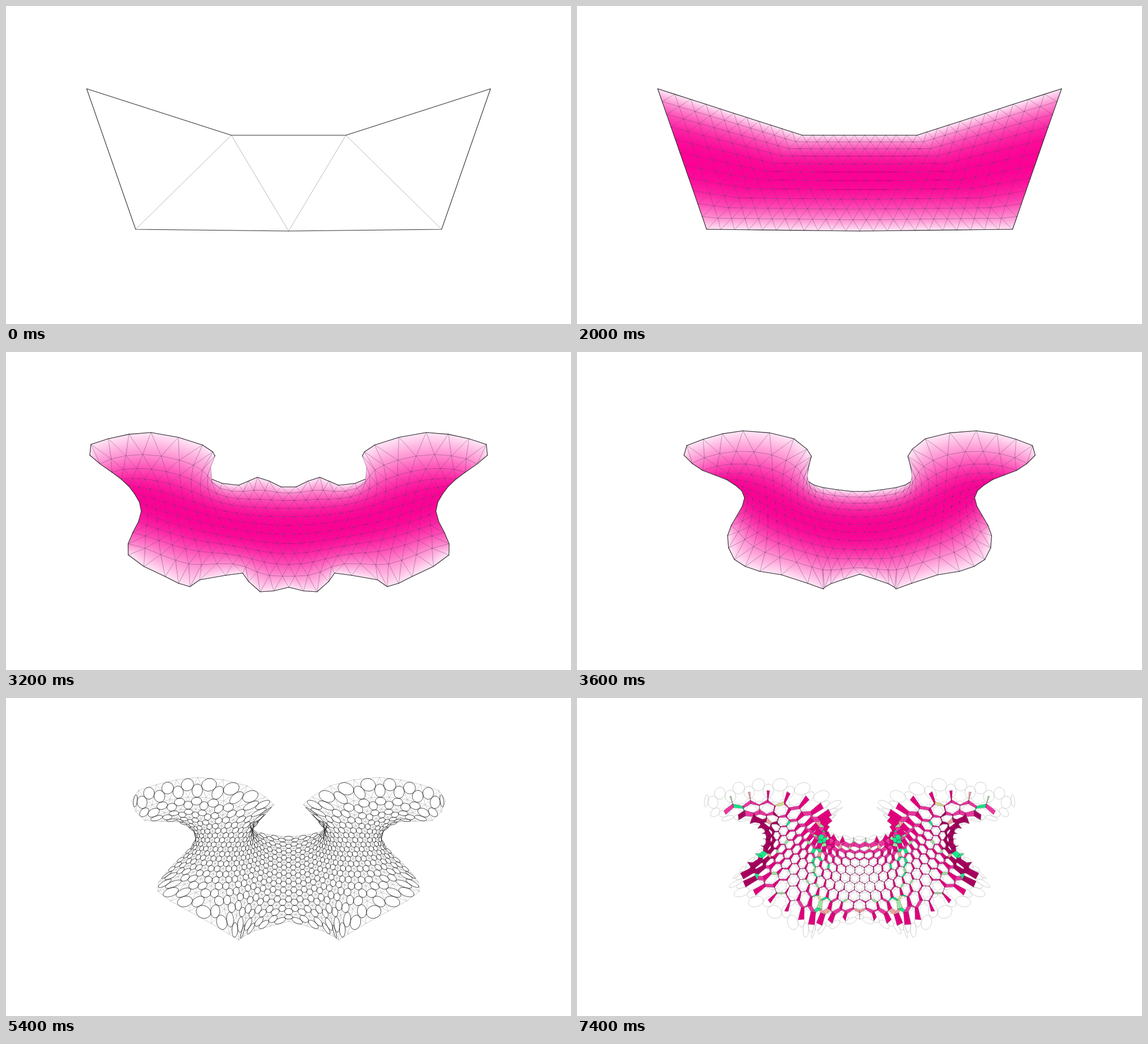
These frames come from a looping animation (998 px wide and 561 px high, 8000 ms). An HTML page with a canvas:

```html
<!DOCTYPE html>
<html lang="en">
<head>
<meta charset="utf-8">
<title>Relaxing mesh</title>
<style>
html, body { margin: 0; width: 100%; height: 100%; overflow: hidden; background: #fff; }
canvas { display: block; }
</style>
</head>
<body>
<canvas id="stage" width="998" height="561"></canvas>
<script>
const ctx = document.getElementById('stage').getContext('2d');
ctx.lineJoin = ctx.lineCap = 'round';
const N = 11, MID = 499.2, INK = '#333';
const mix = (a, b, t) => a + (b - a) * t;
const blend = (p, q, t) => p.map((v, k) => mix(v, q[k], t));
const morph = (a, b, t) => a.map((p, k) => blend(p, b[k], t));

// Vertices: row j has 33 - j segments; s runs from -1 to 1 along the row
const verts = [], base = [];
const at = (j, i) => base[j] + i;
for (let j = 0; j <= N; j++) {
  base.push(verts.length);
  for (let i = 0; i <= 33 - j; i++) verts.push({ j, i, s: 2 * i / (33 - j) - 1 });
}

// Flat strip of five triangles, in homogeneous coordinates for perspective
const hom = (x, y, w) => [x * w, y * w, w];
const flatten = ([x, y, w]) => [x / w, y / w];
const mirror = ([x, y, w]) => [2 * MID * w - x, y, w];
const A = hom(142.5, 146, .75), B = hom(398, 228, 1), G = hom(229, 394, .75), F = hom(MID, 397, .75);
const [D, C, E] = [A, B, G].map(mirror);
const tops = [A, B, B, C, C, D], bottoms = [G, G, F, F, E, E];
const outline = [A, B, C, D, E, F, G], folds = [[G, B], [B, F], [F, C], [C, E]];
const flat = verts.map(({ j, i }) => {
  const cuts = [0, N - j, N, 22 - j, 22, 33 - j];
  let k = 0;
  while (k < 4 && i > cuts[k + 1]) k++;
  const left = blend(tops[k], bottoms[k], j / N), right = blend(tops[k + 1], bottoms[k + 1], j / N);
  return flatten(blend(left, right, (i - cuts[k]) / (cuts[k + 1] - cuts[k] || 1)));
});

// Triangles: edge a-b lies on one row, c on the next
const tris = [], edges = new Map();
function addTri(a, b, c) {
  const t = { v: [a, b, c], s: (verts[a].s + verts[b].s + verts[c].s) / 3, sides: [] };
  tris.push(t);
  [[a, b], [b, c], [c, a]].forEach(([p, q]) => {
    const key = Math.min(p, q) + '-' + Math.max(p, q);
    if (!edges.has(key)) edges.set(key, { p, q, tris: [] });
    const e = edges.get(key);
    e.tris.push(t);
    t.sides.push(e);
  });
}
for (let j = 0; j < N; j++) {
  for (let i = 0; i < 33 - j; i++) {
    addTri(at(j, i), at(j, i + 1), at(j + 1, i));
    if (i < 32 - j) addTri(at(j + 1, i), at(j + 1, i + 1), at(j, i + 1));
  }
}
const isRim = t => t.sides.some(e => e.tris.length < 2);
const sideOf = e => Math.abs(e.tris[0].s + e.tris[1].s) / 2;
tris.sort((a, b) => Math.abs(a.s) - Math.abs(b.s));

// Springs are longer near the upper and lower rims of the wings
const springs = verts.map(() => []);
for (const { p, q } of edges.values()) {
  const a = verts[p], b = verts[q], m = (a.j + b.j) / 2;
  const wing = Math.min(1, 1.1 * Math.abs(a.s + b.s));
  const k = 1 / (1 + .85 * wing * Math.exp(-.9 * (Math.min(m, N - m) - .5)));
  springs[p].push([q, k]);
  springs[q].push([p, k]);
}

// Left half of the rim: a spline through key points, slow at its sharp corners
const knots = [0, 2, 4, 6, 8, 10, 12, 15, 16, 18, 20, 23, 27, 29, 31, 32, 34, 36, 38];
const corners = [8, 34];
function spline(keys, k) {
  const last = knots.length - 1;
  let n = 0;
  while (n < last - 1 && k > knots[n + 1]) n++;
  const span = knots[n + 1] - knots[n], t = (k - knots[n]) / span;
  const slope = (m, c) => {
    if (corners.includes(knots[m])) return 0;
    const lo = Math.max(0, m - 1), hi = Math.min(last, m + 1);
    return span * (keys[hi][c] - keys[lo][c]) / (knots[hi] - knots[lo]);
  };
  return [0, 1].map(c => {
    const p = keys[n][c], q = keys[n + 1][c];
    return mix(p, q, t * t * (3 - 2 * t)) + t * (1 - t) * ((1 - t) * slope(n, c) - t * slope(n + 1, c));
  });
}

// Pin the rim and let the springs settle
function relax(text) {
  const keys = text.split(' ').map(p => p.split(',').map(Number));
  const pts = flat.map(p => [...p]), pinned = new Set();
  for (let k = 0; k < 39; k++) {
    const [j, i] = k < 17 ? [0, 16 - k] : k < 27 ? [k - 16, 0] : [N, k - 27];
    const [x, y] = spline(keys, k), l = at(j, i), r = at(j, 33 - j - i);
    pts[l] = [x, y];
    pts[r] = [2 * MID - x, y];
    pinned.add(l).add(r);
  }
  for (let n = 0; n < 500; n++) {
    for (let v = 0; v < pts.length; v++) {
      if (pinned.has(v)) continue;
      let x = 0, y = 0, sum = 0;
      for (const [q, k] of springs[v]) { x += pts[q][0] * k; y += pts[q][1] * k; sum += k; }
      pts[v] = [x / sum, y / sum];
    }
  }
  return pts;
}
const early = relax('486,238 444,221 411,235 358,222 369,183 347,164 256,142 150,163 148,182 ' +
  '187,212 217,237 239,281 216,358 281,396 325,414 342,402 418,390 449,423 499,415');
const middle = relax('486,246 434,239 408,228 408,208 414,184 383,153 293,139 194,165 189,182 ' +
  '222,209 264,225 296,257 266,324 278,366 323,387 361,393 435,418 448,409 499,392');
const settled = relax('485,244 442,236 430,222 450,214 473,188 426,155 339,140 234,163 222,181 ' +
  '245,216 302,218 335,248 282,309 268,341 323,376 363,398 411,427 438,411 499,394');
const burst = morph(flat, early, .5).map(([x, y]) => [mix(MID, x, 1.137), mix(294, y, 1.137)]);

function pose(n) {
  if (n < 1) return burst;
  if (n < 4) return morph(early, middle, (n - 1) / 2);
  return morph(middle, settled, 1 - (1 - (n - 3) / 4) ** 2.6);
}

function path(pts, color, width, closed, fill) {
  ctx.beginPath();
  pts.forEach(p => ctx.lineTo(p[0], p[1]));
  if (closed) ctx.closePath();
  if (fill) { ctx.fillStyle = fill; ctx.fill(); }
  ctx.strokeStyle = color;
  ctx.lineWidth = width;
  ctx.stroke();
}
function rowColor(j) {
  const w = .9 * (1 - Math.min(j, N - j) / 5.5) ** 2.4;
  return `rgb(255,${Math.round(255 * w)},${Math.round(mix(150, 255, w))})`;
}

function drawFolds() {
  folds.forEach(f => path(f.map(flatten), '#888', .6));
  path(outline.map(flatten), INK, 1.1, true);
}

function drawWire(pts) {
  for (const e of edges.values()) path([pts[e.p], pts[e.q]], '#aaa', .6);
}

function drawShaded(pts) {
  for (const t of tris) {
    const [a, b, c] = t.v.map(v => pts[v]);
    const dx = b[0] - a[0], dy = b[1] - a[1];
    const u = ((c[0] - a[0]) * dx + (c[1] - a[1]) * dy) / (dx * dx + dy * dy || 1);
    const fill = ctx.createLinearGradient(a[0] + u * dx, a[1] + u * dy, c[0], c[1]);
    fill.addColorStop(0, rowColor(verts[t.v[0]].j));
    fill.addColorStop(1, rowColor(verts[t.v[2]].j));
    path([a, b, c], 'rgba(70,0,70,.42)', .6, true, fill);
    for (const e of t.sides) if (e.tris.length < 2) path([pts[e.p], pts[e.q]], INK, 1.1);
  }
}

// Inscribed ellipse of each triangle; its flatness gives the projected normal
function inscribe(t) {
  const [a, b, c] = t.v.map(v => settled[v]);
  const x = (a[0] + b[0] + c[0]) / 3, y = (a[1] + b[1] + c[1]) / 3;
  const ux = (c[0] - x) / 2, uy = (c[1] - y) / 2;
  const k = 2 * Math.sqrt(3), vx = (a[0] - b[0]) / k, vy = (a[1] - b[1]) / k;
  const xx = ux * ux + vx * vx, yy = uy * uy + vy * vy, xy = ux * uy + vx * vy;
  const d = Math.hypot((xx - yy) / 2, xy), m = (xx + yy) / 2;
  const angle = Math.atan2(2 * xy, xx - yy) / 2;
  const major = Math.sqrt(m + d), minor = Math.sqrt(Math.max(0, m - d));
  const tilt = 1 - (minor / major) ** 2;
  return { x, y, major, minor, angle, nx: -Math.sin(angle) * tilt, ny: Math.cos(angle) * tilt };
}
tris.forEach(t => t.disc = inscribe(t));
const along = (d, h) => [d.x + d.nx * h, d.y + d.ny * h];

function drawDiscs(color, width) {
  ctx.strokeStyle = color;
  ctx.lineWidth = width;
  for (const { disc: d } of tris) {
    ctx.beginPath();
    ctx.ellipse(d.x, d.y, d.major, d.minor, d.angle, 0, 7);
    ctx.stroke();
  }
}

function drawAxes() {
  for (const { disc } of tris) path([along(disc, -9), along(disc, 9)], INK, .8);
}

// Accents gather along the seams beside the centre and at the wing tips
const accents = ['#17ee8c', '#dcec96', '#f2a8a0', '#9cf0a4'];
function beamColor(e, p, q) {
  const side = sideOf(e), a = verts[e.p], b = verts[e.q];
  const off = Math.abs((p.x + q.x) / 2 - MID), y = (p.y + q.y) / 2;
  const seed = Math.sin(Math.round(side * 997) * 12.9 + (a.j + b.j) * 78.2) * 4375.5;
  const r = seed - Math.floor(seed);
  const seam = off > 52 && off < 82 && y > 240, tip = off > 200 && y < 215;
  if (r < (seam ? .5 : tip ? .6 : .08)) return accents[seam && r < .35 ? 0 : Math.floor(r * 400) % 4];
  if (side > .76 && y > 205) return '#a8005e';
  return a.j === b.j ? '#e4007e' : '#ef38a2';
}

const beams = [...edges.values()].filter(e => e.tris.length === 2 && !e.tris.some(isRim));
beams.sort((a, b) => sideOf(a) - sideOf(b));
function drawBeams() {
  const H = 6.5;
  for (const e of beams) {
    const [p, q] = e.tris.map(t => t.disc);
    const g = p.nx * q.nx + p.ny * q.ny < 0 ? -H : H;
    const quad = [along(p, H), along(q, g), along(q, -g), along(p, -H)];
    path(quad, 'rgba(70,0,45,.5)', .6, true, beamColor(e, p, q));
    path([[p.x, p.y], [q.x, q.y]], 'rgba(70,0,45,.3)', .5);
  }
}

function draw(t) {
  ctx.fillStyle = '#fff';
  ctx.fillRect(0, 0, 998, 561);
  if (t < 2000) {
    if (t >= 1000) drawWire(flat);
    drawFolds();
  } else if (t < 3000) {
    drawShaded(flat);
  } else if (t < 5400) {
    drawShaded(pose(Math.min(7, (t - 3000) / 200)));
  } else if (t < 6400) {
    drawWire(settled);
    drawDiscs(INK, .85);
  } else if (t < 7400) {
    drawDiscs('#aaa', .9);
    drawAxes();
  } else {
    drawDiscs('#ccc', .9);
    drawBeams();
  }
}

// The picture changes only every 200 ms
let shown;
function frame() {
  const t = Math.floor(performance.now() % 8000 / 200) * 200;
  if (t !== shown) draw(shown = t);
  requestAnimationFrame(frame);
}
frame();
</script>
</body>
</html>
```
